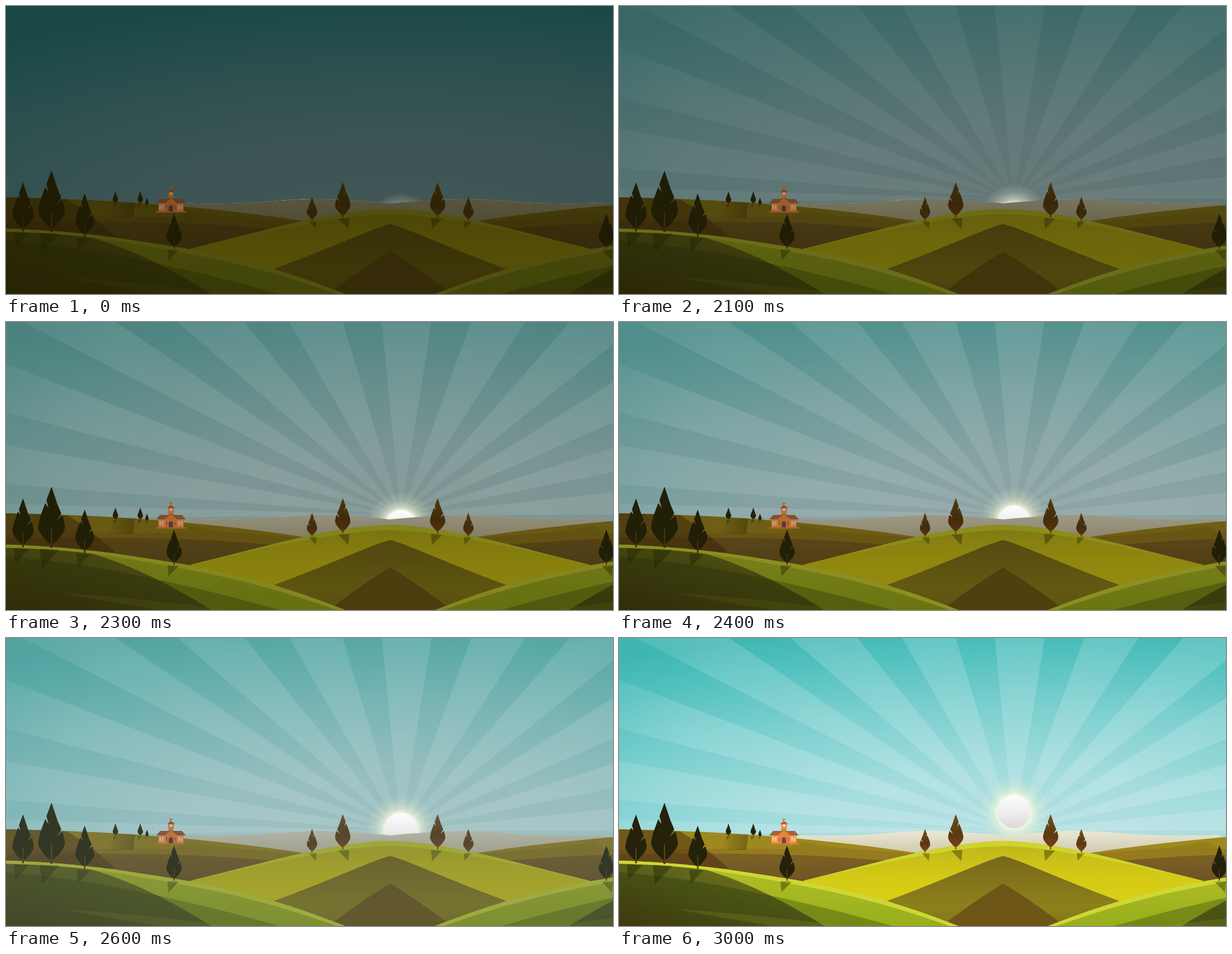
An HTML page without scripts that plays this animation: 1087x515 px, repeating every 3100 ms.

```html
<!DOCTYPE html>
<html lang="en">
<head>
<meta charset="utf-8">
<title>Sunrise over the hills</title>
<style>
html, body { margin: 0; width: 100%; height: 100%; overflow: hidden; background: #1a4a46; }
svg { display: block; width: 100%; height: 100%; }

/* Each segment runs in two 100 ms steps after a two second hold. */
.air, .land, .rays, .sun, .school { animation: 3.1s steps(2) infinite; }
.air { animation-name: air; }
.land { animation-name: land; }
.rays { animation-name: rays; }
.sun { animation-name: rise; }
.school { animation-name: school; }

@keyframes air {
  0%, 64.5% { fill: rgb(6,13,12); opacity: .65; }
  64.51% { fill: rgb(30,36,33); opacity: .65; }
  70.96% { fill: rgb(78,82,80); opacity: .62; }
  77.41% { fill: rgb(98,95,92); opacity: .46; }
  83.87% { fill: rgb(120,125,125); opacity: .32; }
  90.32% { fill: rgb(120,125,125); opacity: .16; }
  96.77%, 100% { fill: rgb(120,125,125); opacity: 0; }
}
@keyframes land {
  0%, 64.5% { fill: rgb(30,26,2); opacity: .71; }
  64.51% { fill: rgb(30,26,2); opacity: .64; }
  70.96% { fill: rgb(30,26,2); opacity: .47; }
  77.41% { fill: rgb(32,28,4); opacity: .38; }
  83.87% { fill: rgb(80,92,87); opacity: .37; }
  90.32% { fill: rgb(80,92,87); opacity: .18; }
  96.77%, 100% { fill: rgb(80,92,87); opacity: 0; }
}
@keyframes rays {
  0%, 64.5% { opacity: 0; }
  64.51% { opacity: .15; }
  70.96% { opacity: .5; }
  77.41% { opacity: .62; }
  83.87% { opacity: .72; }
  90.32% { opacity: .88; }
  96.77%, 100% { opacity: 1; }
}
@keyframes rise {
  0%, 64.5% { transform: translateY(86px); }
  64.51% { transform: translateY(78px); }
  96.77%, 100% { transform: translateY(0); }
}
.sun { animation-timing-function: steps(10); }
@keyframes school {
  0%, 64.5% { filter: brightness(.6); }
  64.51% { filter: brightness(.66); }
  70.96% { filter: brightness(.73); }
  77.41% { filter: brightness(.8); }
  83.87% { filter: brightness(.86) saturate(.8); }
  90.32% { filter: brightness(.94) saturate(.9); }
  96.77%, 100% { filter: brightness(1) saturate(1); }
}
</style>
</head>
<body>
<svg viewBox="0 0 1087 515" preserveAspectRatio="none">
  <defs>
    <radialGradient id="sky" gradientUnits="userSpaceOnUse" cx="0" cy="0" r="1"
      gradientTransform="translate(707 420) scale(1300 450)">
      <stop offset=".1" stop-color="#b8e0e2"/>
      <stop offset=".4" stop-color="#a4dcde"/>
      <stop offset=".65" stop-color="#7ed0d0"/>
      <stop offset=".9" stop-color="#4dbfbc"/>
      <stop offset="1.0" stop-color="#40b6b2"/>
    </radialGradient>
    <radialGradient id="beam" gradientUnits="userSpaceOnUse" cx="707" cy="345" r="820">
      <stop offset="0" stop-color="#fff" stop-opacity=".1"/>
      <stop offset=".2" stop-color="#fff" stop-opacity=".17"/>
      <stop offset=".75" stop-color="#fff" stop-opacity=".16"/>
      <stop offset="1" stop-color="#fff" stop-opacity=".05"/>
    </radialGradient>
    <radialGradient id="glow">
      <stop offset=".45" stop-color="#fffff0" stop-opacity=".85"/>
      <stop offset=".58" stop-color="#fbfbd8" stop-opacity=".5"/>
      <stop offset=".75" stop-color="#f6f6d0" stop-opacity=".22"/>
      <stop offset="1" stop-color="#f0f4d4" stop-opacity="0"/>
    </radialGradient>
    <linearGradient id="disc" x2="0" y2="1">
      <stop offset="0" stop-color="#fdfdfd"/>
      <stop offset=".45" stop-color="#f1f0f0"/>
      <stop offset="1" stop-color="#dcd8d8"/>
    </linearGradient>
    <linearGradient id="haze" x2="0" y2="1">
      <stop offset="0" stop-color="#eae8d6"/>
      <stop offset="1" stop-color="#c4bd9c"/>
    </linearGradient>
    <linearGradient id="field" x2="0" y2="1">
      <stop offset="0" stop-color="#9c8a20"/>
      <stop offset="1" stop-color="#a5851f"/>
    </linearGradient>
    <linearGradient id="soil" x2="0" y2="1">
      <stop offset="0" stop-color="#7d6224"/>
      <stop offset="1" stop-color="#6d5226"/>
    </linearGradient>
    <linearGradient id="gold" x2="0" y2="1">
      <stop offset="0" stop-color="#bdb41c"/>
      <stop offset=".4" stop-color="#d4c916"/>
      <stop offset="1" stop-color="#e2d614"/>
    </linearGradient>
    <linearGradient id="plough" x2="0" y2="1">
      <stop offset="0" stop-color="#78681a"/>
      <stop offset=".7" stop-color="#8c801c"/>
      <stop offset="1" stop-color="#857618"/>
    </linearGradient>
    <linearGradient id="grass" x2="0" y2="1">
      <stop offset="0" stop-color="#b4c128"/>
      <stop offset="1" stop-color="#98ae1c"/>
    </linearGradient>
    <linearGradient id="dark" x1="1" x2="0" y2="1">
      <stop offset="0" stop-color="#7c7f1c"/>
      <stop offset=".5" stop-color="#5a601a"/>
      <stop offset="1" stop-color="#4d3e12"/>
    </linearGradient>
    <linearGradient id="fade">
      <stop offset="0" stop-color="#3c2c08" stop-opacity="0"/>
      <stop offset="1" stop-color="#3c2c08" stop-opacity=".4"/>
    </linearGradient>
    <linearGradient id="bark" x2="0" y2="1">
      <stop offset="0" stop-color="#6a501a"/>
      <stop offset=".6" stop-color="#5c3812"/>
      <stop offset="1" stop-color="#7c4522"/>
    </linearGradient>

    <!-- origin at the foot of the trunk -->
    <g id="tree">
      <path d="M-12 1L8 2L-10 21Z" fill="#1c2000" fill-opacity=".38"/>
      <path d="M0-63L6-45L10-35.500L5-28L11.500-33L13.500-24Q14.500-20 12-16Q7-8 1-4V0H-1V-4Q-7-8-12-16Q-14.500-20-13.500-24L-12-31L-6.500-46L-3-41L-5.200-49Z"/>
      <path d="M0-20V0" stroke="#6a4a1c" stroke-width="1.100"/>
    </g>

    <g id="half">
      <path d="M300 352C400 355 440 352 490 348C560 342 600 346 640 349Q670 351 688 353V400H300Z" fill="url(#haze)"/>
      <path d="M0 342Q140 345 240 352Q400 364 530 384L560 440H0Z" fill="url(#field)"/>
      <path d="M322 364L412 378H300Z" fill="#7a6a10" fill-opacity=".3"/>
      <path d="M0 377H420L520 385L500 400H0Z" fill="#8c6f20" fill-opacity=".5"/>
      <path d="M0 386Q270 384 380 391L478 398L420 440H0Z" fill="url(#soil)"/>
      <path d="M0 342Q60 343 110 346Q150 370 196 412H0Z" fill="#4c2c10" fill-opacity=".52"/>
      <path d="M198 351L231 352L228 379H180Z" fill="url(#fade)"/>

      <path d="M330 434C450 406 580 365 688 363V515H330Z" fill="url(#gold)"/>
      <path d="M330 434C450 406 580 365 688 363V372C590 374 470 404 330 434Z" fill="#cfd42c"/>
      <path d="M688 390C660 396 570 438 480 470L600 515H688Z" fill="url(#plough)"/>
      <path d="M688 439C660 456 620 482 584 511V515H688Z" fill="#6e5618"/>
      <g fill="url(#bark)">
        <use href="#tree" transform="translate(603 378) scale(-1 1)"/>
        <use href="#tree" transform="translate(548 384) scale(-.68 .68)"/>
      </g>

      <path d="M0 398C130 402 210 416 300 430C410 448 510 476 608 515H0Z" fill="url(#grass)"/>
      <path d="M0 404C60 405 110 409 150 413C230 436 300 473 368 515H0Z" fill="url(#dark)"/>
      <path d="M0 419C150 430 330 470 490 515H0Z" fill="#203008" fill-opacity=".3"/>
      <path d="M105 485Q250 494 400 515H275Q190 502 105 485Z" fill="#a0a02c" fill-opacity=".2"/>
      <path d="M0 398C130 402 210 416 300 430C410 448 510 476 608 515H592C500 482 410 457 300 438C210 421 130 407 0 403Z" fill="#cfd734"/>
      <use href="#tree" transform="translate(301 434)" fill="#24220a"/>
    </g>

    <g id="ground">
      <use href="#half"/>
      <use href="#half" transform="matrix(-1 0 0 1 1376 0)"/>
      <g fill="#24220a">
        <use href="#tree" transform="translate(30.500 403) scale(1.390)"/>
        <use href="#tree" transform="translate(81.500 404) scale(1.740)"/>
        <use href="#tree" transform="translate(141 413) scale(1.230)"/>
        <use href="#tree" transform="translate(196 354) scale(.35)"/>
        <use href="#tree" transform="translate(240.500 354) scale(.35)"/>
        <use href="#tree" transform="translate(252.500 356) scale(.21)"/>
      </g>
    </g>
    <mask id="shape" style="mask-type:alpha" maskUnits="userSpaceOnUse" x="0" y="0" width="1087" height="515">
      <use href="#ground"/>
    </mask>
  </defs>

  <rect width="1087" height="515" fill="url(#sky)"/>
  <rect class="air" width="1087" height="515"/>

  <path class="rays" fill="url(#beam)" d="M707 345L0 352V325Z M707 345L0 290V220Z M707 345L0 162V75Z
    M707 345L30 0H197Z M707 345L307 0H427Z M707 345L507 0H603Z M707 345L673 0H762Z M707 345L833 0H930Z
    M707 345L1010 0H1087V40Z M707 345L1087 107V180Z M707 345L1087 225V268Z M707 345L1087 305V345Z"/>

  <g class="sun">
    <circle cx="707.500" cy="311" r="63" fill="url(#glow)"/>
    <circle cx="707.500" cy="311" r="29.500" fill="url(#disc)"/>
  </g>

  <use href="#ground"/>
  <g mask="url(#shape)"><rect class="land" width="1087" height="515"/></g>

  <g class="school">
    <path d="M268 367H323V369.500H268Z" fill="#e0742c"/>
    <path d="M273 352H318V367H273Z" fill="#f0994c"/>
    <path d="M276 345H315L322 353H269Z" fill="#a8623c"/>
    <path d="M285 351L295 342L306 351V367H285Z" fill="#e8843a"/>
    <path d="M284 352L295 342L307 352" fill="none" stroke="#9c5a3c" stroke-width="1.500"/>
    <path d="M290.500 332H300.500V343H290.500Z" fill="#ee8c3e"/>
    <path d="M288 333L295.500 327L303 333Z" fill="#b4633a"/>
    <path d="M293 328V323H299L297 325.500H294.500V328Z" fill="#e87a30"/>
    <circle cx="295.500" cy="335.500" r="2.400" fill="#f3e6d2"/>
    <path d="M291.500 367V359Q295.500 353 299 359V367Z" fill="#6c4650"/>
    <path d="M276 356V363M280.500 356V363M310 356V363M314.500 356V363" stroke="#f8dfc0" stroke-width="2"/>
    <path d="M287.500 357V363M303 357V363" stroke="#a05c48" stroke-width="1.500"/>
  </g>
</svg>
</body>
</html>
```
